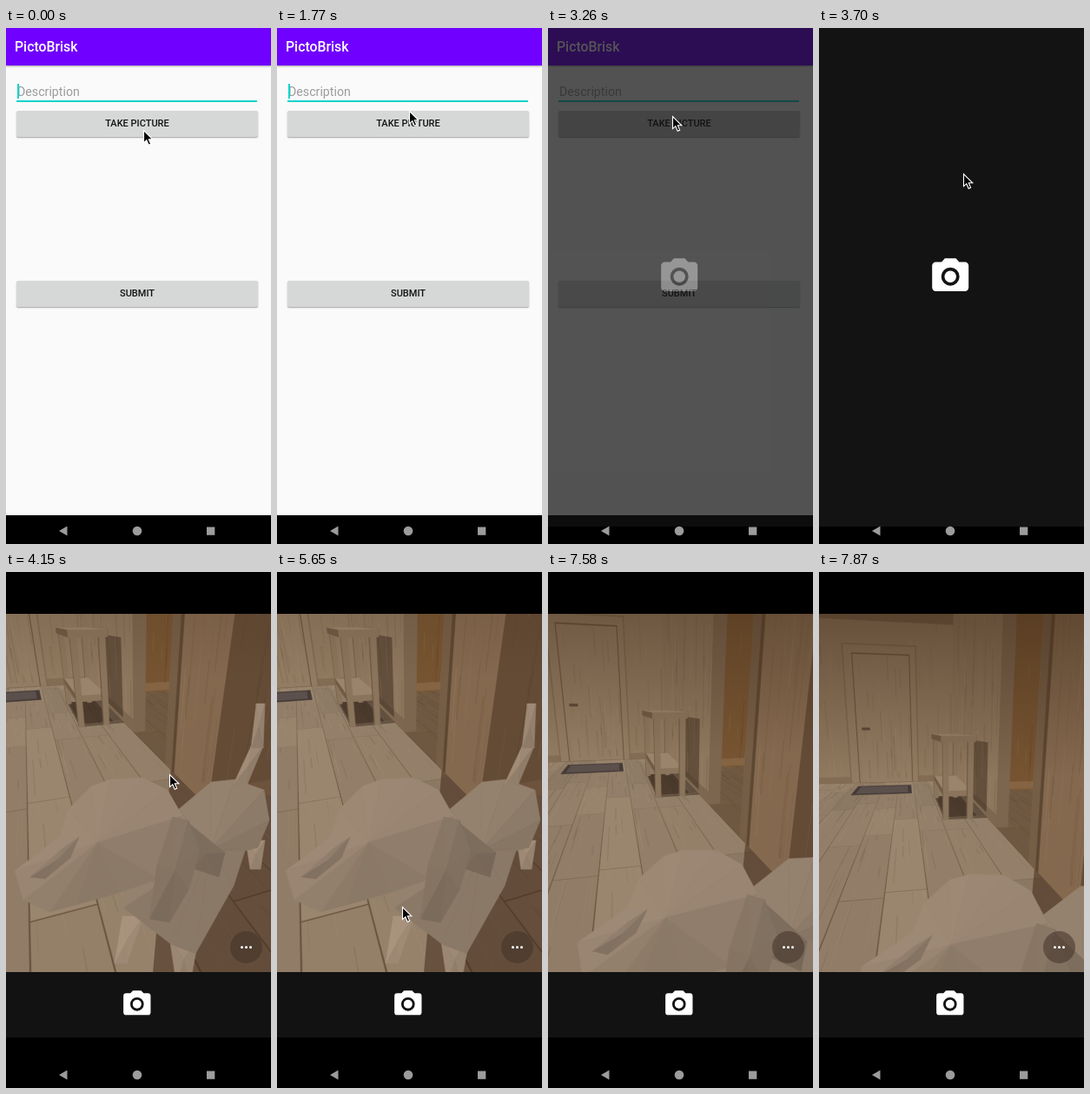
An HTML page with a canvas that plays this animation: 305 by 592 pixels, repeating every 8000 ms.

```html
<!DOCTYPE html>
<html lang="en">
<head>
<meta charset="utf-8">
<title>Camera demo</title>
<style>
  html, body { margin: 0; width: 305px; height: 592px; overflow: hidden; background: #000; }
  body { position: relative; font-family: Roboto, sans-serif; }
  div, canvas, svg { position: absolute; }
  #app { width: 305px; height: 559px; background: #fafafa; overflow: hidden; }
  #title { width: 295px; height: 43px; padding-left: 10px; background: #7000ff; color: #fff;
    font: 500 15.8px/43px Roboto, sans-serif; box-shadow: 0 1px 2px rgba(0,0,0,.35); }
  #hint { left: 13px; top: 63px; font-size: 14.2px; line-height: 20px; color: #9b9b9b; }
  #line { left: 12px; top: 83px; width: 277px; height: 2px; background: #12d5cc; }
  #caret { left: 13px; top: 64px; width: 1.5px; height: 17px; background: #12d5cc; }
  .btn { left: 12px; width: 278px; height: 30px; border-radius: 2px; background: #d6d7d7; overflow: hidden;
    box-shadow: 0 1px 1.5px rgba(0,0,0,.35); }
  .btn b { position: absolute; inset: 0; text-align: center; color: #111; font: 500 11px/30px Roboto, sans-serif; }
  #ripple { left: 133px; top: 10px; border-radius: 50%; background: rgba(0,0,0,.08);
    transform: translate(-50%, -50%); }
  #splash { width: 305px; height: 572px; background: #131313; }
  #logo { left: 125.8px; top: 259.8px; }
  #camera { width: 305px; height: 592px; background: #000; }
  #view { top: 48px; left: 0; }
  #bar { top: 459px; width: 305px; height: 75px; background: #121212; }
  #shutter { left: 132.3px; top: 476.6px; }
  #more { left: 258px; top: 412px; width: 37px; height: 37px; border-radius: 50%; background: rgba(66,50,40,.55); }
  #more i { position: absolute; top: 17px; width: 3px; height: 3px; border-radius: 50%; background: #fff; }
  #nav { left: 0; top: 559px; }
  #cursor { left: 0; top: 0; overflow: visible; }
</style>
</head>
<body>
<div id="app">
  <div id="title">PictoBrisk</div>
  <div id="hint">Description</div>
  <div id="line"></div>
  <div id="caret"></div>
  <div class="btn" style="top:95px"><div id="ripple"></div><b>TAKE PICTURE</b></div>
  <div class="btn" style="top:290px"><b>SUBMIT</b></div>
</div>
<div id="splash">
  <svg id="logo" viewBox="0 0 24 24" width="50.4" height="50.4" fill="#fff"><use href="#cam"/></svg>
</div>
<div id="camera">
  <canvas id="view" width="305" height="411"></canvas>
  <div id="more"><i style="left:12px"></i><i style="left:17px"></i><i style="left:22px"></i></div>
  <div id="bar"></div>
  <svg id="shutter" viewBox="0 0 24 24" width="37.6" height="37.6" fill="#fff">
    <g id="cam">
      <path d="M9 2 7.17 4H4a2 2 0 0 0-2 2v12a2 2 0 0 0 2 2h16a2 2 0 0 0 2-2V6a2 2 0 0 0-2-2h-3.17L15 2zm3 15a5 5 0 1 1 0-10 5 5 0 0 1 0 10z"/>
      <circle cx="12" cy="12" r="3.2"/>
    </g>
  </svg>
</div>
<svg id="nav" width="305" height="33" fill="#9c9c9c">
  <path d="M61 18l9.5-5.5v11z"/><circle cx="151" cy="18" r="5.3"/><rect x="231" y="13.5" width="9.3" height="9.3"/>
</svg>
<svg id="cursor" width="13" height="19">
  <path d="M.5 .5V14.6L3.8 11.7 6.2 17.2 8.6 16.1 6.3 10.8H10.8Z" fill="#000" stroke="#fff" stroke-width="1.1"/>
</svg>

<script>
const $ = id => document.getElementById(id);
const LOOP = 8000, TICKS = 54;
const clamp = v => Math.min(1, Math.max(0, v));
const ramp = (k, a, b) => clamp((k - a) / (b - a));

// Pointer: each move runs from one tick to another and ends at x, y
const MOVES = [[8, 12, 152, 95], [13, 17, 143, 101], [22, 28, 188, 232], [28, 32, 149, 350], [34, 37, 144, 384]];
function pointer(k) {
  let x = 158, y = 117;
  for (const [a, b, tx, ty] of MOVES) {
    const f = ramp(k, a, b);
    x += (tx - x) * f;
    y += (ty - y) * f;
  }
  return [Math.round(x), Math.round(y)];
}

// Camera angles in degrees: tilt up, then tilt further while turning left
function pose(k) {
  const lift = ramp(k, 39, 47), turn = ramp(k, 47, 53);
  return [30 - 5 * lift - 13 * turn, 18.5 - 10 * turn];
}

// Pinhole camera one unit above the floor; x right, y down, z along the planks
const FOCAL = 340, CX = 152, CY = 253, DEG = Math.PI / 180;
const lens = ([pitch, yaw]) => ({
  cp: Math.cos(pitch * DEG), sp: Math.sin(pitch * DEG), c: Math.cos(yaw * DEG), s: Math.sin(yaw * DEG)
});
function project([x, y, z], m) {
  const right = x * m.c - z * m.s, fwd = x * m.s + z * m.c;
  const depth = Math.max(.05, fwd * m.cp + y * m.sp);
  return [CX + FOCAL * right / depth, CY + FOCAL * (y * m.cp - fwd * m.sp) / depth];
}
function unproject([px, py], m) {
  const u = (px - CX) / FOCAL, v = (py - CY) / FOCAL, fwd = m.cp - v * m.sp;
  return [u * m.c + fwd * m.s, v * m.cp + m.sp, fwd * m.c - u * m.s];
}

let seed = 7;
const rnd = (a = 0, b = 1) => {
  seed = (seed * 16807) % 2147483647;
  return a + (b - a) * seed / 2147483647;
};
const tone = (rgb, k) => `rgb(${rgb.map(v => Math.round(v * k))})`;

const scene = [];
const add = (color, ...pts) => scene.push({ color, pts });
const stroke = (color, width, ...pts) => scene.push({ color, pts, width });
const flat = (c, y, x0, x1, z0, z1) => add(c, [x0, y, z0], [x1, y, z0], [x1, y, z1], [x0, y, z1]);
const front = (c, z, x0, x1, y0, y1) => add(c, [x0, y0, z], [x1, y0, z], [x1, y1, z], [x0, y1, z]);
const side = (c, x, z0, z1, y0, y1) => add(c, [x, y0, z0], [x, y0, z1], [x, y1, z1], [x, y1, z0]);
function box(x0, x1, y0, y1, z0, z1) {
  flat('#9a846b', y0, x0, x1, z0, z1);
  side('#705a45', x0, z0, z1, y0, y1);
  front('#8a745c', z0, x0, x1, y0, y1);
}
// Short wood fibres; place(t, s) maps the unit square to a surface
function grain(count, length, place) {
  for (let i = 0; i < count; i++) {
    const t = rnd(), s = rnd();
    stroke(rnd() < .55 ? 'rgba(60,42,26,.1)' : 'rgba(195,172,142,.1)', rnd(.6, 1.6),
      place(t, s), place(t, Math.min(1, s + rnd(.2, 1) * length)));
  }
}

const WALL = .905, BACK = 5.75, CEIL = -1.83, PLANK = .267;
const SHADE = 'rgba(48,32,20,.45)';
const tall = s => CEIL + s * 2.7;

function buildFloor() {
  flat('#6a5440', 1, -3, 3.2, .3, BACK);
  for (let x = -3.1; x < 3; x += PLANK) {
    for (let z = rnd(-1, .2), end; z < BACK; z = end) {
      end = z + rnd(.9, 1.7);
      const a = Math.max(z, .3), b = Math.min(end, BACK), left = x;
      if (b <= a) continue;
      flat(tone([147, 127, 105], rnd(.94, 1.05)), 1, x + .004, x + PLANK - .004, a + .004, b - .004);
      grain(8, .5, (t, s) => [left + PLANK * (.06 + .88 * t), 1, a + (b - a) * s]);
    }
  }
  flat('rgba(70,42,18,.45)', 1, WALL, 3, 2, 4.7);
  add('rgba(60,34,18,.5)', [.12, 1, .3], [WALL, 1, 1.9], [3, 1, 1.9], [3, 1, .3]);
}

function buildRoom() {
  flat('#755d46', CEIL, -3, WALL, 2.5, BACK);
  front('#8f795f', BACK, -3, WALL, CEIL, 1);
  front('#826c53', BACK, -3, WALL, .88, 1);
  grain(110, .3, (t, s) => [-3 + t * 3.9, tall(s), BACK]);

  // Door in its frame, with handle
  front('#7d6750', BACK, -1.06, .22, -1.46, 1);
  front('#927b62', BACK, -1.04, .2, -1.44, 1);
  front('#66513d', BACK, -.9, .1, -1.31, 1);
  front('#927c63', BACK, -.885, .085, -1.29, .99);
  grain(40, .3, (t, s) => [-.88 + t * .96, -1.28 + s * 2.2, BACK]);
  front('#5d4a39', BACK, -.8, -.66, -.03, .01);

  buildFloor();
  flat('#453a36', 1, -.88, .06, 4.7, 5.42);
  flat('#5b504c', 1, -.82, 0, 4.8, 5.34);

  // Passage behind the opening
  front('#765431', 4.7, 1, 4, -2.2, 1);
  front('#846443', 4.7, 1, 4, .86, .98);
  grain(40, .3, (t, s) => [1.1 + t * 1.6, tall(s), 4.7]);

  // Right wall, its end face, and the wall after the opening
  side('#8d765d', WALL, 2.85, BACK, CEIL - .2, 1);
  side('#7d6750', WALL, 2.85, BACK, .87, 1);
  side(SHADE, WALL, 3.25, 4.1, .14, .95);
  grain(50, .3, (t, s) => [WALL, tall(s), 2.9 + t * 2.8]);
  front('#7c664f', 2.85, WALL, 1.03, CEIL - .2, 1);

  side('#84694f', WALL, 1.33, 2, CEIL, 1);
  side('#755d46', WALL, 1.88, 2, CEIL, 1);
  side('#5c4733', WALL, 1.84, 1.88, CEIL, 1);
  grain(34, .3, (t, s) => [WALL, tall(s), 1.35 + t * .45]);
  front('#644b36', 1.33, WALL, 3, CEIL, 1);
  front('#6d533c', 1.33, WALL, 3, .88, 1);
  grain(36, .3, (t, s) => [WALL + t * .9, tall(s), 1.33]);

  // Small stand: legs, shelf and top
  flat(SHADE, 1, .4, WALL, 3.2, 4.4);
  flat(SHADE, 1, .42, .8, 3.3, 4.4);
  const leg = (x, z) => box(x, x + .06, .1, 1, z, z + .06);
  leg(.39, 4.3);
  leg(.68, 4.3);
  box(.4, .72, .68, .74, 3.24, 4.36);
  leg(.39, 3.2);
  leg(.67, 3.2);
  box(.37, .75, .07, .13, 3.18, 4.4);
}

// Dog: outlines seen from the first pose, split into facets around the
// middle of each part; facets facing the upper left are lighter
const FUR = [147, 128, 109], HOME = lens(pose(0));
const pairs = list => list.reduce((out, v, i) => (i % 2 ? out[out.length - 1].push(v) : out.push([v]), out), []);
function part(k, ...list) {
  const pts = pairs(list), n = pts.length;
  const mid = [0, 1].map(i => pts.reduce((sum, p) => sum + p[i], 0) / n);
  pts.forEach((p, i) => {
    const q = pts[(i + 1) % n], len = Math.hypot(q[0] - p[0], q[1] - p[1]);
    const lit = (.4 * (p[1] - q[1]) + .9 * (q[0] - p[0])) / len;
    add(tone(FUR, k * (1 + .055 * lit + rnd(-.02, .02))), ...[p, q, mid].map(v => unproject(v, HOME)));
  });
}
function limb(k, x0, y0, r0, x1, y1, r1) {
  part(k, x0 - r0, y0, x0 + r0, y0, x1 + r1, y1, x1 - r1, y1);
}

function buildDog() {
  limb(1.04, 287, 308, 11, 287, 341, 6);
  limb(1.04, 205, 418, 17, 204, 472, 8);
  limb(1.1, 146, 395, 12, 132, 449, 7);
  part(.97, 150, 300, 199, 272, 236, 241, 263, 238, 297, 250, 303, 285, 290, 316,
    275, 320, 262, 360, 218, 438, 190, 427, 135, 385);
  limb(1.03, 289, 200, 7, 270, 243, 8);
  limb(1.03, 293, 151, 5, 289, 202, 7);
  part(.84, 205, 284, 252, 322, 245, 350, 215, 340);
  part(1.02, 10, 343, 62, 303, 72, 272, 98, 246, 120, 238, 157, 236, 186, 250, 203, 280,
    176, 352, 130, 368, 80, 382, 50, 390, 20, 376);
  part(.93, 28, 350, 64, 318, 84, 304, 74, 328, 45, 352);
  part(.89, 192, 281, 210, 285, 223, 320, 210, 365, 188, 402, 165, 398, 174, 335);
}

buildRoom();
buildDog();

const ctx = $('view').getContext('2d');
ctx.translate(0, -48);
ctx.lineJoin = 'round';

function drawScene(angles) {
  const m = lens(angles);
  for (const { color, pts, width } of scene) {
    ctx.beginPath();
    for (const p of pts) ctx.lineTo(...project(p, m));
    ctx.strokeStyle = ctx.fillStyle = color;
    ctx.lineWidth = width || .5;
    if (!width) {
      ctx.closePath();
      ctx.fill();
    }
    if (width || !color.startsWith('rgba')) ctx.stroke();
  }
  // The room gets darker towards the ceiling
  const height = up => CY - FOCAL * Math.tan((angles[0] + up) * DEG);
  const dusk = ctx.createLinearGradient(0, height(19), 0, height(-9));
  dusk.addColorStop(0, 'rgba(62,40,22,.5)');
  dusk.addColorStop(1, 'rgba(62,40,22,0)');
  ctx.fillStyle = dusk;
  ctx.fillRect(0, 48, 305, 411);
}

let lastPose = '';
function render(k) {
  const [x, y] = pointer(k);
  $('cursor').style.display = k < 40 ? '' : 'none';
  $('cursor').style.transform = `translate(${x}px, ${y}px)`;

  const flips = Math.floor((k - .5) / 3.2) + 1;
  $('caret').style.display = flips % 2 ? 'none' : '';
  $('ripple').style.width = $('ripple').style.height = 290 * ramp(k, 17, 20) + 'px';

  const dim = k < 22 ? 0 : Math.min(1, .72 + .14 * (k - 22));
  $('splash').style.opacity = dim;
  $('logo').style.opacity = dim ** 2.8;
  $('camera').style.display = k >= 27 ? '' : 'none';

  const angles = pose(k);
  if (angles.join() !== lastPose) {
    drawScene(angles);
    lastPose = angles.join();
  }
}

const start = performance.now();
let lastTick = -1;
function loop() {
  const t = (performance.now() - start) % LOOP;
  const k = Math.floor(t / LOOP * TICKS + .06) % TICKS;
  if (k !== lastTick) render(lastTick = k);
  requestAnimationFrame(loop);
}
loop();
</script>
</body>
</html>
```
